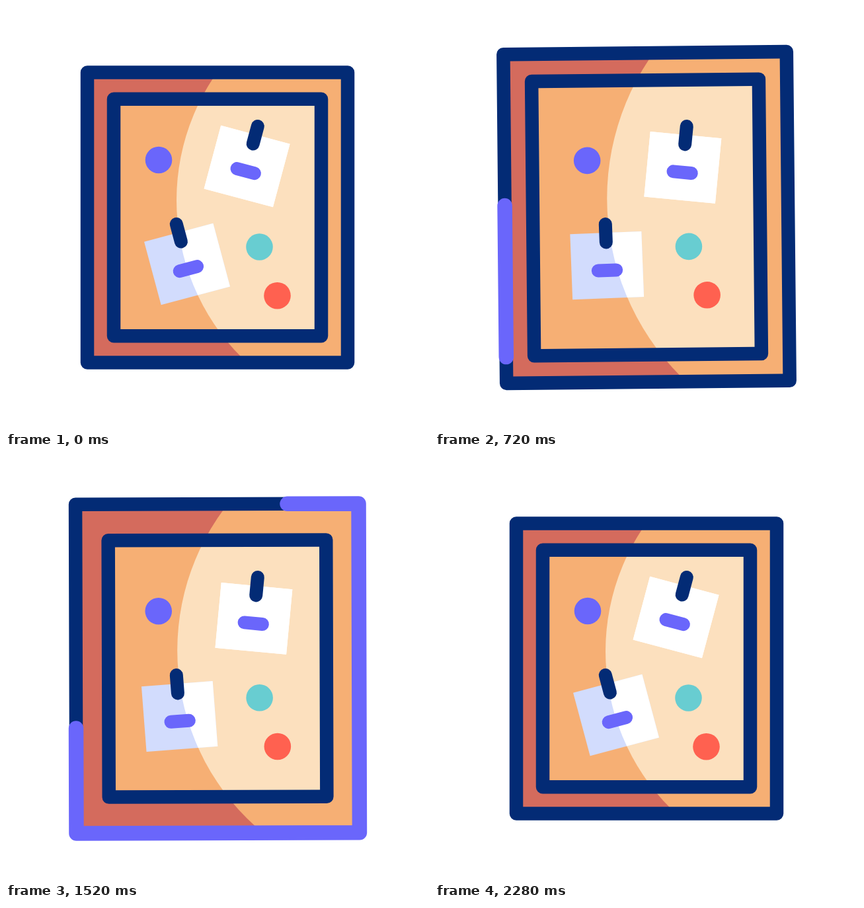
Recreate the animation shown at these times as an HTML page with a canvas. Size 640 by 640 pixels, loop 2440 ms.

```html
<!DOCTYPE html>
<html lang="en">
<head>
<meta charset="utf-8">
<title>Pin board</title>
<style>
  html, body { margin: 0; width: 100%; height: 100%; overflow: hidden; background: #fff; }
  canvas { display: block; width: 640px; height: 640px; }
</style>
</head>
<body>
<canvas id="stage" width="640" height="640"></canvas>
<script>
const ctx = document.getElementById('stage').getContext('2d');
const LOOP = 2440, STEP = 40, MID = 320;
const NAVY = '#032b75', PURPLE = '#6a66fb', ORANGE = '#f6af74', CREAM = '#fce0be',
      RUST = '#d46b5d', TEAL = '#68cdd1', RED = '#ff6150', SHADE = '#d2dcfd', WHITE = '#fff';

// [time, value] keys, eased in and out between neighbours
const TILT = [[340, 0], [530, 2], [850, -2], [1140, 2], [1390, -2], [1665, 2], [1990, -2], [2270, 0]];
const RIGHT_NOTE = [[390, 15], [1000, -2], [2140, 15]];
const LEFT_NOTE = [[340, -15], [660, -1.5], [1030, -11.5], [1350, -1], [1880, -15]];
const OUTER = [[308, 0], [872, 1], [1368, 1], [1932, 0]];
const HEAD = [[471, 0], [1604, 1]];
const TAIL = [[1082, 0], [2200, 1]];

const clamp = x => Math.min(1, Math.max(0, x));
const mix = (a, b, p) => a + (b - a) * p;
const smooth = x => x * x * (3 - 2 * x);
const rad = deg => deg * Math.PI / 180;

// cubic-bezier(.33, 0, .25, 1)
function quick(x) {
  let lo = 0, hi = 1;
  for (let i = 0; i < 24; i++) {
    const s = (lo + hi) / 2, r = 1 - s;
    if (3 * r * r * s * .33 + 3 * r * s * s * .25 + s * s * s < x) lo = s; else hi = s;
  }
  return smooth(lo);
}

function at(keys, t) {
  if (t <= keys[0][0]) return keys[0][1];
  for (let i = 1; i < keys.length; i++) {
    const [t0, a] = keys[i - 1], [t1, b] = keys[i];
    if (t < t1) return mix(a, b, smooth((t - t0) / (t1 - t0)));
  }
  return keys[keys.length - 1][1];
}

const innerGrow = t => quick(clamp((t - 200) / 800)) - quick(clamp((t - 1250) / 760));

function disc(x, y, r, color) {
  ctx.beginPath();
  ctx.arc(x, y, r, 0, 2 * Math.PI);
  ctx.fillStyle = color;
  ctx.fill();
}

function capsule(x0, y0, x1, y1, color) {
  ctx.beginPath();
  ctx.moveTo(x0, y0);
  ctx.lineTo(x1, y1);
  ctx.lineWidth = 20;
  ctx.strokeStyle = color;
  ctx.stroke();
}

// clockwise from the bottom left corner
function box(w, h) {
  ctx.beginPath();
  ctx.moveTo(-w / 2, h / 2);
  ctx.lineTo(-w / 2, -h / 2);
  ctx.lineTo(w / 2, -h / 2);
  ctx.lineTo(w / 2, h / 2);
  ctx.closePath();
}

function turned(x, y, deg, draw) {
  ctx.save();
  ctx.translate(x, y);
  ctx.rotate(rad(deg));
  draw();
  ctx.restore();
}

// fills a turned shape in two tones, split by the unturned light circle
function twoTone(x, y, deg, shape, dark, light, spot) {
  ctx.save();
  ctx.translate(x, y);
  ctx.rotate(rad(deg));
  shape();
  ctx.fillStyle = dark;
  ctx.fill();
  ctx.clip();
  ctx.rotate(-rad(deg));
  ctx.translate(-x, -y);
  disc(spot.x, spot.y, spot.r, light);
  ctx.restore();
}

function frame(w, h) {
  box(w, h);
  ctx.lineWidth = 20.5;
  ctx.strokeStyle = NAVY;
  ctx.stroke();
}

function runner(w, h, t) {
  const tail = at(TAIL, t), length = at(HEAD, t) - tail;
  if (length < .001) return;
  const around = 2 * (w + h), shift = (t - 505) * .0001;
  ctx.save();
  box(w, h);
  ctx.setLineDash([length * around, (1 - length) * around]);
  ctx.lineDashOffset = -(tail + shift) * around;
  ctx.lineWidth = 22.5;
  ctx.strokeStyle = PURPLE;
  ctx.stroke();
  ctx.restore();
}

function note(x, y, deg, dark, spot) {
  const paper = () => {
    ctx.beginPath();
    ctx.rect(-54, 13.2, 108, 99);
  };
  twoTone(x, y, deg, paper, dark, WHITE, spot);
  turned(x, y, deg, () => {
    capsule(0, 0, 0, 27.5, NAVY);
    capsule(-13.7, 70, 13.7, 70, PURPLE);
  });
}

function draw(t) {
  const tilt = at(TILT, t), big = at(OUTER, t), small = innerGrow(t);
  const w = mix(394, 436, big), h = mix(439, 510.5, big);
  const iw = mix(314, 347, small), ih = mix(358.5, 421.5, small);
  const r = mix(336, 385, small);
  const spot = { x: mix(258, 260.5, small) + r, y: mix(294, 291, small), r };

  ctx.fillStyle = WHITE;
  ctx.fillRect(0, 0, 640, 640);
  ctx.lineCap = ctx.lineJoin = 'round';

  twoTone(MID, MID, tilt, () => box(w, h), RUST, ORANGE, spot);
  twoTone(MID, MID, tilt, () => box(iw, ih), ORANGE, CREAM, spot);
  turned(MID, MID, tilt, () => {
    frame(iw, ih);
    frame(w, h);
    runner(w, h, t);
    disc(-89, -87, 20.3, PURPLE);
    disc(63.5, 44.5, 20.3, TEAL);
    disc(90.5, 118.2, 20.3, RED);
  });
  note(380.8, 182, at(RIGHT_NOTE, t), WHITE, spot);
  note(257.8, 330, at(LEFT_NOTE, t), SHADE, spot);
}

const start = performance.now();
function tick() {
  const t = (performance.now() - start) % LOOP;
  draw(Math.floor(t / STEP) * STEP);
  requestAnimationFrame(tick);
}
tick();
</script>
</body>
</html>
```
